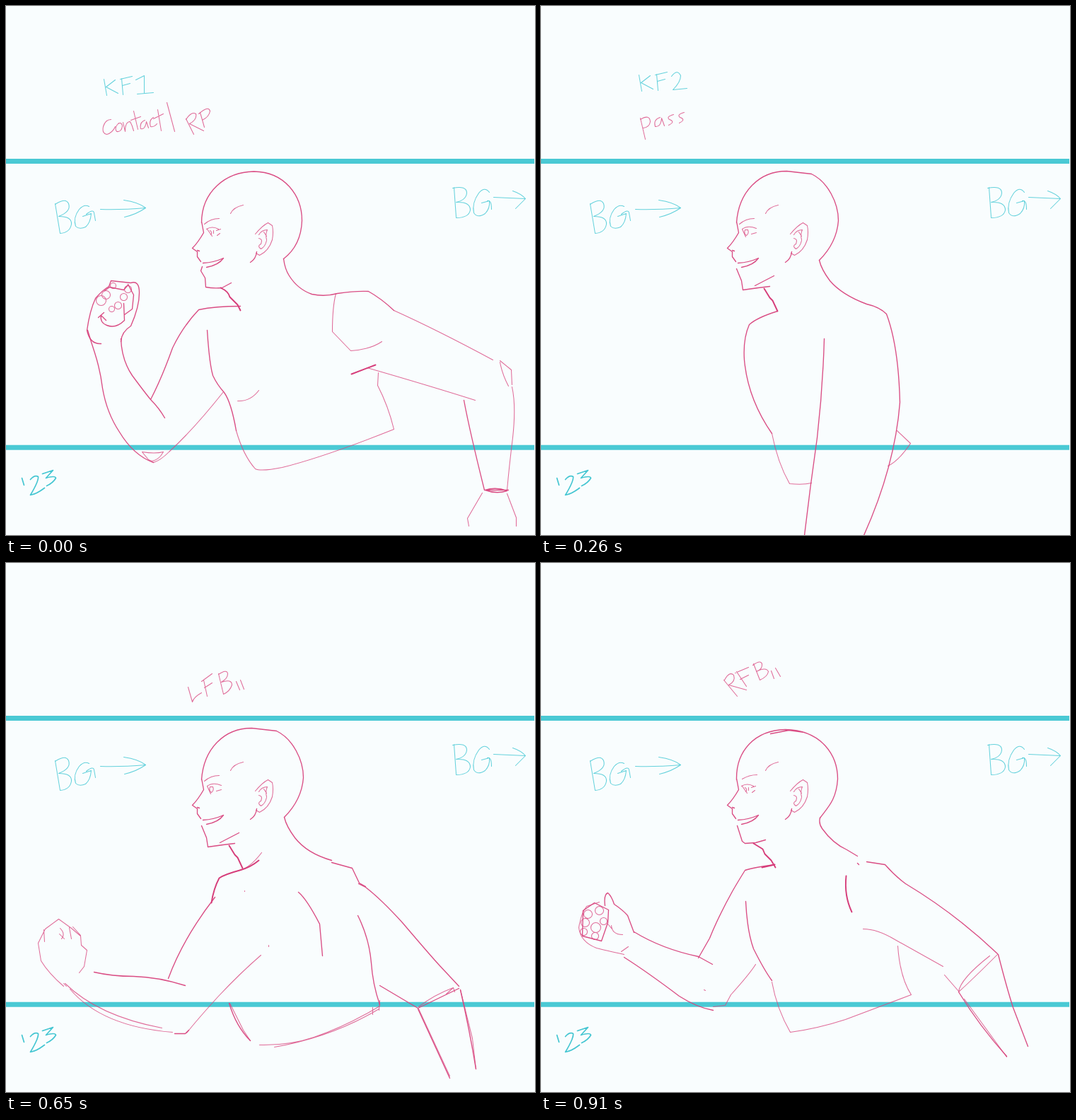
Animation, 748 px wide and 748 px high, one loop 1.04 s. Source, as an HTML page:

```html
<!DOCTYPE html>
<html lang="en">
<head>
<meta charset="utf-8">
<title>Run cycle rough</title>
<style>
html, body { margin: 0; width: 100%; height: 100%; overflow: hidden; background: #f9fdfe; }
svg { display: block; width: 100vw; height: 100vh; }
path { fill: none; stroke-linecap: round; stroke-linejoin: round; }
.thin { stroke: #da4880; stroke-width: 1.05; opacity: .8; }
.mid { stroke: #d9447e; stroke-width: 1.35; opacity: .95; }
.bold { stroke: #d63d7a; stroke-width: 1.9; }
.note { stroke: #4ccbd6; stroke-width: 1.05; opacity: .85; }
.date { stroke: #45c6d2; stroke-width: 1.7; }
.bar { stroke: #4ac9d4; stroke-width: 7; stroke-linecap: butt; }
</style>
</head>
<body>
<svg id="stage" viewBox="0 0 748 748"></svg>
<script>
const STEP = 130;
const NS = 'http://www.w3.org/2000/svg';

function add(parent, tag, attrs) {
  const el = document.createElementNS(NS, tag);
  for (const k in attrs) el.setAttribute(k, attrs[k]);
  return parent.appendChild(el);
}
const line = (cls, d, transform = '') => ({ class: cls, d, transform });
const thin = (...d) => line('thin', d.join(''));
const mid = (...d) => line('mid', d.join(''));
const bold = (...d) => line('bold', d.join(''));
const note = (d, move) => line('note', d, move);
const ring = (x, y, r) => `M${x - r} ${y}a${r} ${r} 0 1 0 ${2 * r} 0a${r} ${r} 0 1 0 ${-2 * r} 0`;

// Fixed layout
const layout = [
  line('bar', 'M-1 219H746.5M-1 623.7H746.5'),
  note('M69 279L76 321M69 280Q84 270 88 279Q92 290 74 297Q93 297 92 308Q90 320 76 321' +
    'M117 283Q110 279 103 287Q94 299 98 311Q103 316 112 312Q119 306 120 293L108 297M113 294Q123 286 124 292L126 303' +
    'M133 287Q162 288 197 285M166 274Q187 277 197 285Q184 294 167 298'),
  note('M633 256L636 298M631 257Q651 253 651 264Q650 274 636 277Q656 276 656 288Q654 299 636 299' +
    'M683 263Q676 254 668 264Q658 278 661 292Q666 300 677 293Q684 286 683 275L672 278M680 275Q686 273 686 287' +
    'M689 270L734 272M716 261Q728 265 734 272L720 286'),
  line('date', 'M22 667L25 677M34 669Q40 662 45 665Q46 671 34 691Q42 690 54 681M51 661L66 656L56 667Q69 663 70 667Q66 674 57 678')
];

// Head pieces
const nose = 'M276 304L279 320Q271 334 263 342L270 347L270 354L275 361M270 345l3 1';
const ear = 'M352 322Q362 310 370 306L376 310Q378 319 376 330Q371 346 358 352L353 349' +
  'M357 323Q361 316 369 316Q366 322 368 330M357 328Q363 329 360 336Q354 339 360 343Q366 340 368 331M364 319l4 6';
const lobe = 'M354 347Q353 357 345 362';
const grin = 'M278 363Q294 362 307 356Q300 366 283 369';
const browBack = 'M317 293Q321 284 335 281';
const softEye = 'M283 315Q291 310 300 315M284 315L291 325M288 317q4 3 1 6M293 317v4M297 317L303 315M298 324L302 321';
const sharpEye = 'M284 315Q292 309 304 314M284 315L289 326M288 316q-2 6 2 8q4-3 2-8ZM297 322L304 320';
const browA = 'M280 308Q289 300 301 300';
const browB = 'M284 305Q294 299 305 299';

const head = (skull, chin, throat, brow, eye, mouth = grin) => [
  mid(skull, nose, chin, mouth, lobe), thin(ear, brow, browBack, eye), bold(throat)
];

const headA = head(
  'M276 306C276 262 310 234 350 233.5C394 234 418 268 418 303C417 330 405 347 392 357',
  'M277 368L275 374L281 384L282 397Q292 399 305 398L318 391', 'M303 398Q314 403 316 411L327 422L331 430', browA, softEye);
const headB = head(
  'M276 306C275 265 302 236 345 235C397 236 419 272 419 305C417 335 405 345 394 360M324 241L350 236L372 239',
  'M277 371L284 393L288 396L303 395L317 391', 'M300 396L313 404L316 411L325 420L331 430', browB, softEye);
const headC = head(
  'M276 306C279 262 308 233 347 233L382 237C405 248 420 278 420 303C418 330 405 347 393 359',
  'M276 371L283 388L285 401Q305 398 323 396M302 395L329 381', 'M315 399L323 412L327 416L334 431', browA, sharpEye);
const headD = head(
  'M277 304C279 262 310 234 350 233C388 236 414 258 418 285L418 305C414 330 404 345 392 360',
  'M276 371L282 383L288 396Q304 398 317 393', 'M304 397Q316 403 318 409L330 418L338 428', browA, sharpEye,
  'M278 361Q290 361 303 358M281 368Q290 367 299 363');

// Handwritten labels
const kf = 'M138 103L142 126M154 104L141 114L158 123M163 102L165 125M161 103L178 99M164 112L175 109';
const contact = 'M148 160Q140 160 137 170Q135 180 142 181Q150 179 154 170M159 165Q152 172 156 177Q163 178 164 169Q163 163 158 166' +
  'M165 164L168 177Q168 163 175 163Q178 168 180 176M180 148L186 174M176 161L190 156' +
  'M196 161Q188 164 190 173Q196 175 198 163L201 172M208 157Q201 161 204 170Q209 171 213 166M214 146L219 176M208 159L222 152';
const pass = 'M140 158L147 188M140 160Q153 152 154 163Q153 171 144 172M168 157Q158 160 161 170Q169 171 170 158L174 169' +
  'M187 153Q176 156 181 160Q190 163 180 168M202 150Q191 153 196 157Q205 160 195 165';
const rfb = 'M258 165L277 188M259 165Q266 152 272 158Q275 167 265 172L290 179M276 153L290 174M274 155L293 147M281 164L293 158' +
  'M300 142L309 165M299 144Q310 136 312 142Q313 150 304 153Q318 146 321 153Q320 160 309 165';
const lfb = 'M257 175L263 196Q265 189 276 183M279 165L284 188M276 167L291 156M280 176L291 169' +
  'M300 156L307 185M300 157Q312 149 313 156Q313 163 304 168Q319 163 319 172Q316 181 307 185';

// Pose: first contact
const contactOne = [
  ...headA,
  note(kf + 'M183 104L195 98L195 123M185 124L208 122'),
  thin(contact, 'M227 136L238 177M254 159L265 181M254 160Q262 148 268 152Q270 160 259 166L279 176M274 150L280 171M272 152Q286 140 288 148Q287 156 277 161'),
  mid('M392 357Q394 372 400 381Q412 400 432 407Q450 411 468 406Q495 402 512 403Q530 413 548 430',
    'M331 424Q295 424 272 429Q250 452 235 483Q220 525 204 556',
    'M162 470Q163 500 178 522Q195 545 204 556Q216 568 224 582',
    'M115 458Q120 475 125 490Q133 515 136 540Q142 575 160 602Q180 635 208 645',
    'M284 458Q287 505 292 522Q298 535 308 546Q318 560 325 600',
    'M647 557Q655 600 676 684'),
  thin('M548 430Q610 458 688 500M510 511Q600 537 663 557',
    'M466 406Q461 425 461 460L487 487Q515 485 531 474',
    'M698 501L714 514L715 535M698 503Q701 520 710 537M715 538Q721 565 716 610Q711 650 708 684',
    'M673 688Q662 707 652 724L654 735M708 689L721 723L721 735',
    'M208 645Q218 642 230 630Q265 598 307 545M192 630Q210 633 222 630L218 636Q208 646 201 641Q195 634 192 630',
    'M325 600Q335 635 352 654Q360 658 390 652Q450 637 548 598Q540 565 525 536L526 518M327 558Q345 559 357 543'),
  bold('M488 520L522 507'),
  mid('M677 684Q692 679 708 685Q693 690 677 684L710 684'),
  mid('M134 477Q118 478 114 458Q118 430 126 413Q135 402 145 396L148 388L176 391Q188 387 188 405Q188 425 176 452Q163 460 162 474',
    'M172 393L180 408L178 428L167 436M166 420L167 444Q155 456 142 451Q132 447 134 437L141 444M130 440L138 433',
    'M139 402L146 397L166 401L172 394'),
  thin(ring(134, 416, 7), ring(141, 408, 6), ring(151, 395, 4), ring(158, 423, 5), ring(149, 428, 4), ring(166, 411, 5), ring(172, 400, 5))
];

// Pose: right arm back
const rightBack = again => [
  ...headB,
  thin(rfb, again ? 'M325 152l4 11M331 148l7 12' : ''),
  mid(again ? 'M460 422L486 426Q500 442 515 453' : 'M443 420L486 426Q500 440 520 456',
    'M394 360Q392 368 397 375Q412 396 432 405' + (again ? 'L447 414M447 424l2 2' : 'L459 420'),
    'M515 453Q585 495 645 552',
    'M646 553Q658 600 667 628L688 683M590 606Q620 655 658 697',
    'M330 426Q300 430 288 434Q275 455 270 464Q250 500 238 530L222 558',
    'M117 557Q150 578 195 612Q220 628 243 632M289 478Q291 520 300 545Q315 575 326 590'),
  thin('M645 553Q610 588 590 606Q592 588 634 555M598 616L658 698',
    'M455 517Q475 517 500 532Q550 560 568 570M570 582L590 605',
    'M326 592Q333 630 352 663Q390 658 430 645L523 610Q507 585 504 541',
    'M243 627L260 625L268 610Q295 580 303 567M230 603l2 1'),
  bold('M431 442Q428 470 439 493M312 430L330 426'),
  mid('M131 521Q170 545 222 556L242 567',
    'M90 484Q88 468 94 466Q99 470 103 482Q115 490 122 498L131 522',
    'M85 534L94 508L95 490L75 480L59 491L58 527L85 534'),
  thin('M117 553Q90 547 78 544Q55 535 53 515Q56 495 64 485L82 479M99 512Q100 525 115 525M94 510l6 7',
    ring(66, 496, 6), ring(62, 508, 6), ring(60, 521, 5), ring(77, 515, 7), ring(76, 527, 5), ring(88, 506, 5), ring(82, 491, 6),
    again ? 'M123 542L113 549' : 'M134 526L121 555M131 525L116 550')
];

// Pose: left arm forward
const leftForward = again => [
  ...headC,
  thin(lfb, again ? 'M325 167l5 12M331 165l5 13' : ''),
  mid('M393 359Q396 372 408 388Q425 410 460 420M460 423L489 431',
    again ? 'M489 431L499 452L508 457M498 453l10 5' : 'M489 431Q500 442 516 471',
    'M508 458Q530 475 560 508Q600 555 612 568L640 598',
    'M642 603Q655 660 664 715M582 630Q605 680 627 728M528 597L582 629L640 601',
    'M413 465Q425 475 443 510L447 555M497 498Q513 530 516 565Q518 595 528 624',
    'M124 578Q150 584 180 584Q215 585 ' + (again ? '253 597' : '248 595')),
  thin('M583 627Q605 610 632 600M622 609l10-9l2 6M642 603L659 672L664 715M583 630L627 725',
    'M528 626Q480 655 435 670Q400 682 358 681M527 630Q460 670 379 684M528 618L527 632M518 628v10M371 540v2',
    'M255 664Q270 645 300 612Q330 580 360 554'),
  again
    ? mid('M295 472Q250 530 229 587M315 622Q325 655 345 675M238 665H253M253 665l5-5')
    : mid('M280 487Q245 535 229 587M307 605Q320 645 338 673M83 594Q110 615 125 627Q170 665 255 664'),
  again
    ? thin('M361 409Q345 430 330 434M83 594Q130 640 220 657M90 602Q135 655 235 663M316 622L335 660L345 675M337 463v1')
    : thin('M357 417Q345 430 330 438M83 594L120 624'),
  again
    ? bold('M357 420Q345 430 330 434Q308 440 301 445Q293 460 290 480')
    : bold('M330 438Q310 447 298 455Q285 470 282 484'),
  thin('M81 598Q60 580 49 562L45 537L55 517L74 503L92 516L105 527L106 540L114 547L110 570L103 579',
    'M53 518L54 535M76 516Q84 524 78 531M75 524L82 531M89 515l3 16M94 514l11 12M81 594l4 4')
];

// Pose: second contact
const contactTwo = [
  ...headD,
  note('M132 115L141 135M152 110L138 122L158 130M157 112L162 130M150 113L164 106M157 118L166 114M173 101L190 96L181 106Q196 103 194 110Q190 117 177 120'),
  line('thin', contact, 'translate(-37 -23) scale(1.13 1.07)'),
  thin('M219 142Q230 128 233 140Q232 155 221 166L251 161'),
  mid('M391 362L394 373Q400 390 412 402M412 400L440 412L468 417L497 432',
    'M652 474Q675 530 693 591M379 435L407 463Q409 500 414 536',
    'M491 468Q496 495 494 520Q496 550 508 572L548 613M278 535Q281 570 305 622L348 661',
    'M365 404Q355 425 337 430Q320 433 287 426Q275 427 262 441Q235 458 182 506',
    'M113 400Q108 450 117 510Q125 565 155 597M152 400Q154 450 180 510M182 502L180 515L182 544'),
  thin('M499 431Q560 437 642 465M498 520L618 516',
    'M650 472L618 520M652 477Q645 500 621 519M650 472L640 482L620 516M618 521L656 581',
    'M312 527Q290 530 278 537Q215 578 156 597M111 405Q111 500 133 572L153 596', ring(183, 364, 6)),
  bold('M338 429Q355 423 365 405M412 530L415 536',
    'M113 408Q113 370 117 355L130 341L150 332L175 327L180 333L190 360L184 375L175 392L154 402',
    'M138 336L145 348M160 350L170 358L181 343M176 333L191 362M165 346L168 358'),
  mid('M153 402Q155 385 170 372L180 378')
];

// Pose: arms passing beside the body
const passing = again => [
  ...(again ? headB : headC),
  note(kf + (again ? 'M185 101L184 113L201 111M197 98L199 124' : 'M184 105Q192 94 197 104Q197 113 186 124L206 122'), 'translate(0 -6)'),
  thin(pass),
  mid('M393 359Q396 372 408 388Q425 408 460 421Q478 425 488 435Q505 480 507 560Q500 650 456 748',
    'M334 431Q305 440 294 450Q285 470 287 500Q292 555 326 604',
    'M400 470Q398 540 390 610Q380 680 372 748'),
  thin('M326 604Q334 645 351 675M351 675Q370 677 382 674M503 600L522 618Q505 643 490 650')
];

const poses = [
  contactOne, rightBack(false), passing(false), leftForward(false),
  contactTwo, leftForward(true), passing(true), rightBack(true)
];

// Strokes are centred on whole pixels
const sheet = add(document.getElementById('stage'), 'g', { transform: 'translate(.5 .5)' });
layout.forEach(p => add(sheet, 'path', p));
const groups = poses.map(parts => {
  const g = add(sheet, 'g', { visibility: 'hidden' });
  parts.forEach(p => add(g, 'path', p));
  return g;
});

function render(ms) {
  const now = Math.floor(ms / STEP) % groups.length;
  groups.forEach((g, i) => g.setAttribute('visibility', i === now ? 'visible' : 'hidden'));
}

const start = performance.now();
function tick() {
  render(Math.max(0, performance.now() - start));
  requestAnimationFrame(tick);
}
tick();
</script>
</body>
</html>
```
